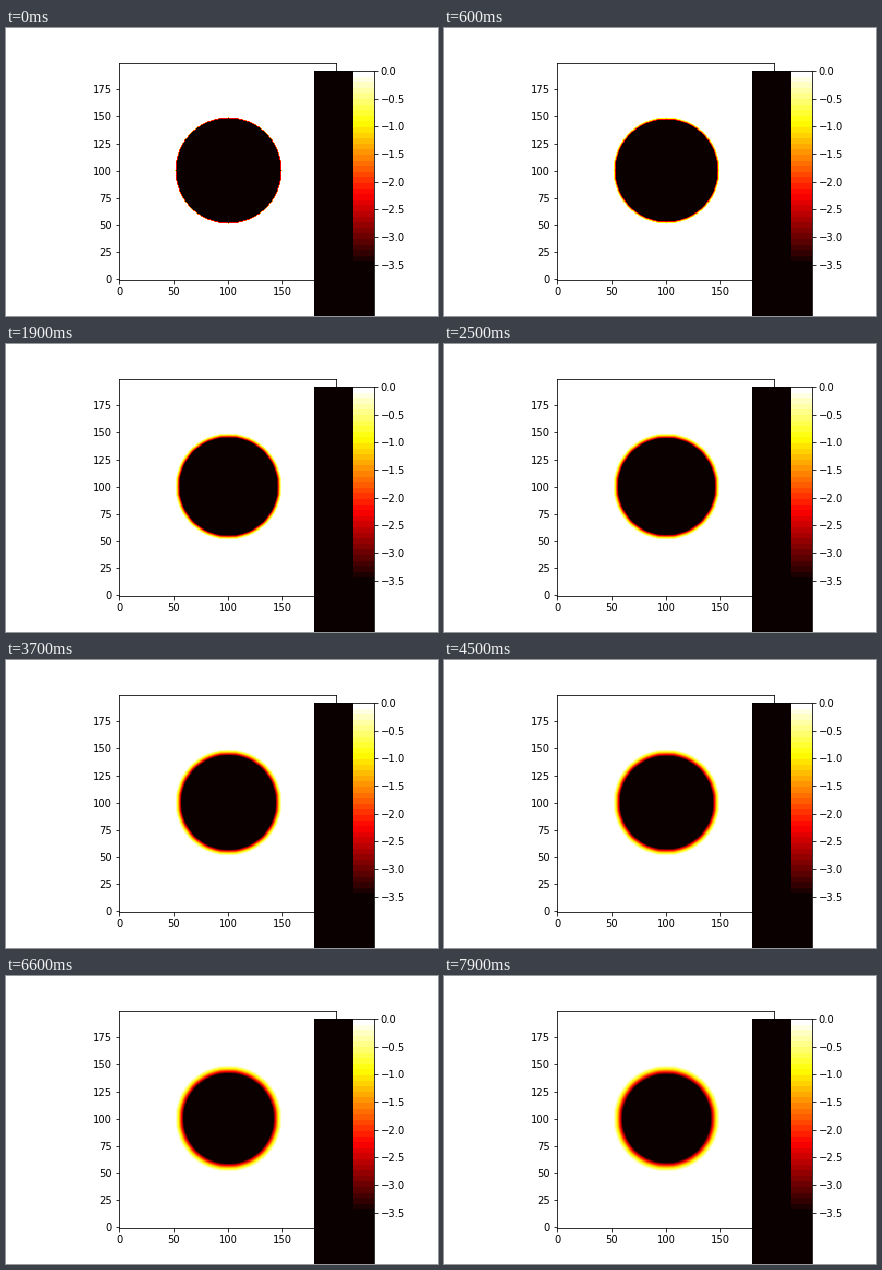
Animation of 432x288 px, one loop 8 s. Source, as a matplotlib script:

```python
import numpy as np
import matplotlib.pyplot as plt
from matplotlib.animation import FuncAnimation

W, H, DPI = 432, 288, 72
FRAMES, INTERVAL = 80, 100
SIZE, CENTER, RADIUS = 200, 100, 49
RATE = 0.1
VMIN = -3.545

plt.rcParams.update({"font.family": "DejaVu Sans", "font.size": 10})

yy, xx = np.mgrid[:SIZE, :SIZE]
disc = (xx - CENTER) ** 2 + (yy - CENTER) ** 2 <= RADIUS ** 2


def diffuse(u):
    """One explicit heat step inside the disc; the outside stays at 1."""
    lap = sum(np.roll(u, s, a) for s in (1, -1) for a in (0, 1)) - 4 * u
    return np.where(disc, u + RATE * lap, 1.0)


def log_fields():
    u = np.where(disc, 0.0, 1.0)
    fields = []
    for _ in range(FRAMES):
        u = diffuse(u)
        fields.append(np.log(np.maximum(u, 1e-12)))
    return fields


fields = log_fields()
fig = plt.figure(figsize=(W / DPI, H / DPI), dpi=DPI, facecolor="white")

ax = fig.add_axes([0.125, 0.125, 0.775, 0.755])
img = ax.imshow(fields[0], cmap="hot", vmin=VMIN, vmax=0,
                origin="lower", interpolation="nearest")
ax.set_xticks(range(0, 200, 50))
ax.set_yticks(range(0, 200, 25))

# Oversized colour bar running off the lower edge
LEFT, RIGHT, TOP, UNIT = 308, 367.5, 43, 55.3
bar = fig.add_axes([LEFT / W, 0.5 / H, (RIGHT - LEFT) / W, (H - TOP - 0.5) / H],
                   zorder=2, facecolor=plt.cm.hot(0))
bar.set_xlim(LEFT, RIGHT)
bar.set_ylim((TOP + 0.5 - H) / UNIT, 0)
steps = np.linspace(VMIN, 0, 36)
bar.pcolormesh([347, RIGHT], steps, np.linspace(0, 1, 35)[:, None], cmap="hot")
bar.set_xticks([])
bar.yaxis.tick_right()
bar.set_yticks(np.arange(0, -3.6, -0.5))
bar.yaxis.set_major_formatter(lambda v, _: f"{v:.1f}".replace("-", "\u2212"))


def update(i):
    img.set_data(fields[i])
    return [img]


anim = FuncAnimation(fig, update, frames=FRAMES, interval=INTERVAL,
                     repeat=True, repeat_delay=0)
plt.show()
```
